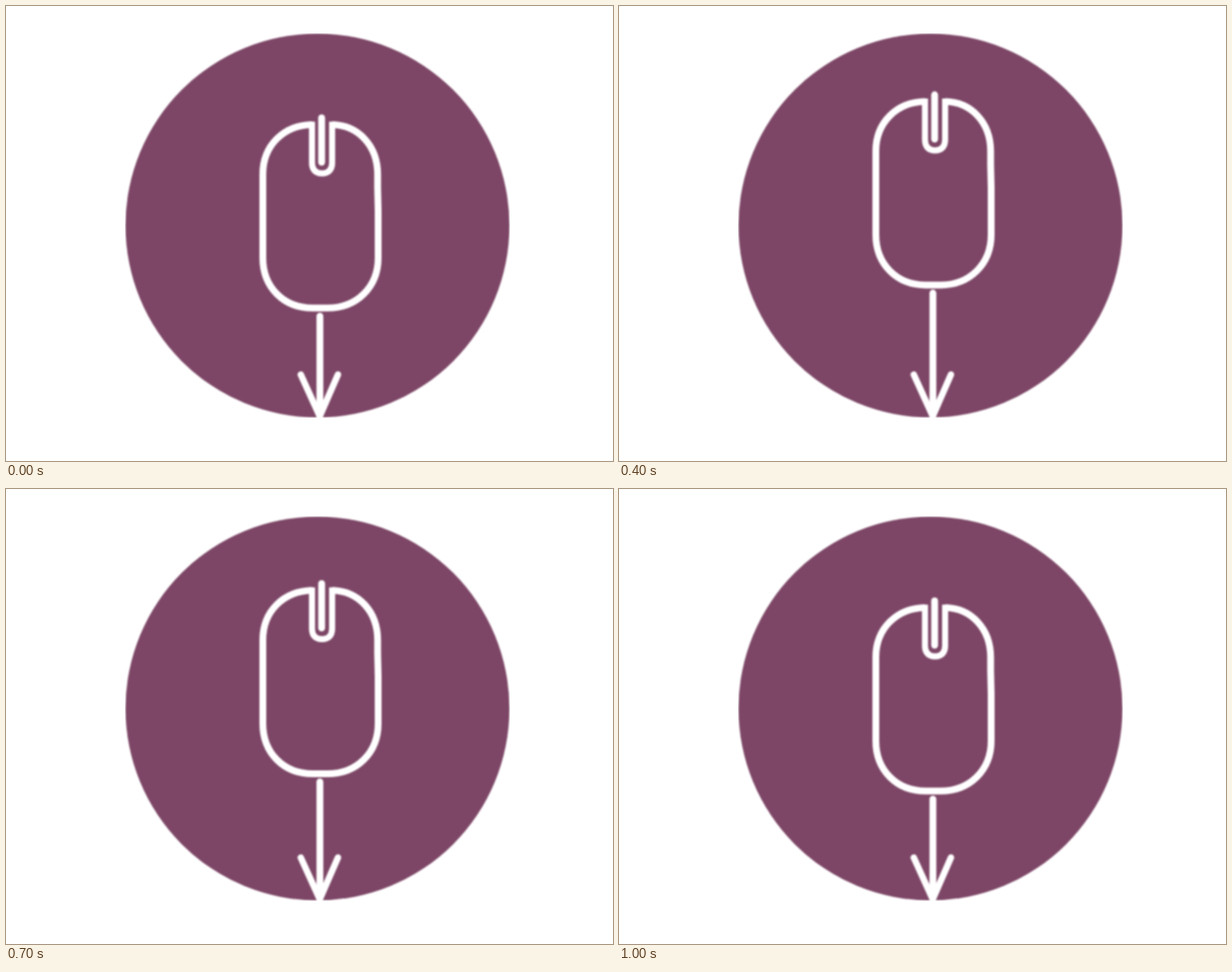
Recreate the animation shown at these times as an HTML page. Size 800x600 px, loop 1100 ms.

```html
<!DOCTYPE html>
<html lang="en">
<head>
<meta charset="utf-8">
<title>Mouse scroll</title>
<style>
  html, body { margin: 0; width: 100%; height: 100%; overflow: hidden; background: #fff; }
  svg { display: block; width: 100vw; height: 100vh; }
</style>
</head>
<body>
<svg viewBox="0 0 800 600">
  <clipPath id="badge"><rect x="157" y="36" width="507" height="507"/></clipPath>
  <filter id="soft" filterUnits="userSpaceOnUse" x="140" y="20" width="540" height="540" color-interpolation-filters="sRGB">
    <feGaussianBlur stdDeviation="1"/>
  </filter>
  <g clip-path="url(#badge)">
    <g filter="url(#soft)" fill="none" stroke="#fff" stroke-width="9">
      <circle cx="410.5" cy="289.5" r="253" fill="#7d4666" stroke="none"/>
      <g id="mouse">
        <path d="M403.5 156.500C366 157 338.500 184 338.500 222V332C338.500 371 366 398.300 404 398.300H424C462 398.300 490.500 371 490.500 332V270L489.800 240V222C489.800 184 464 157 430 156.500"/>
        <path stroke-width="8" d="M403.300 152.500V207C403.300 216 408 220.800 416.500 220.800S429.800 216 429.800 207V152.500"/>
        <path stroke-linecap="round" d="M416 147.500V206"/>
      </g>
      <path id="shaft" stroke-linecap="round"/>
      <path stroke-linecap="round" stroke-linejoin="round" stroke-width="8.500" d="M388.500 486L413.500 541 437.500 486"/>
    </g>
  </g>
</svg>
<script>
  const LOOP = 1100, STEP = 100, RISE = 7.6, PEAK = 5;
  const mouse = document.getElementById('mouse');
  const shaft = document.getElementById('shaft');
  const start = performance.now();

  // The mouse climbs in equal steps to the peak, then returns.
  function draw(time) {
    const step = Math.floor((time % LOOP) / STEP);
    const lift = RISE * (PEAK - Math.abs(step - PEAK));
    mouse.setAttribute('transform', `translate(0 ${-lift})`);
    shaft.setAttribute('d', `M413.7 ${409 - lift}V538`);
  }

  function tick() {
    draw(performance.now() - start);
    requestAnimationFrame(tick);
  }
  tick();
</script>
</body>
</html>
```
